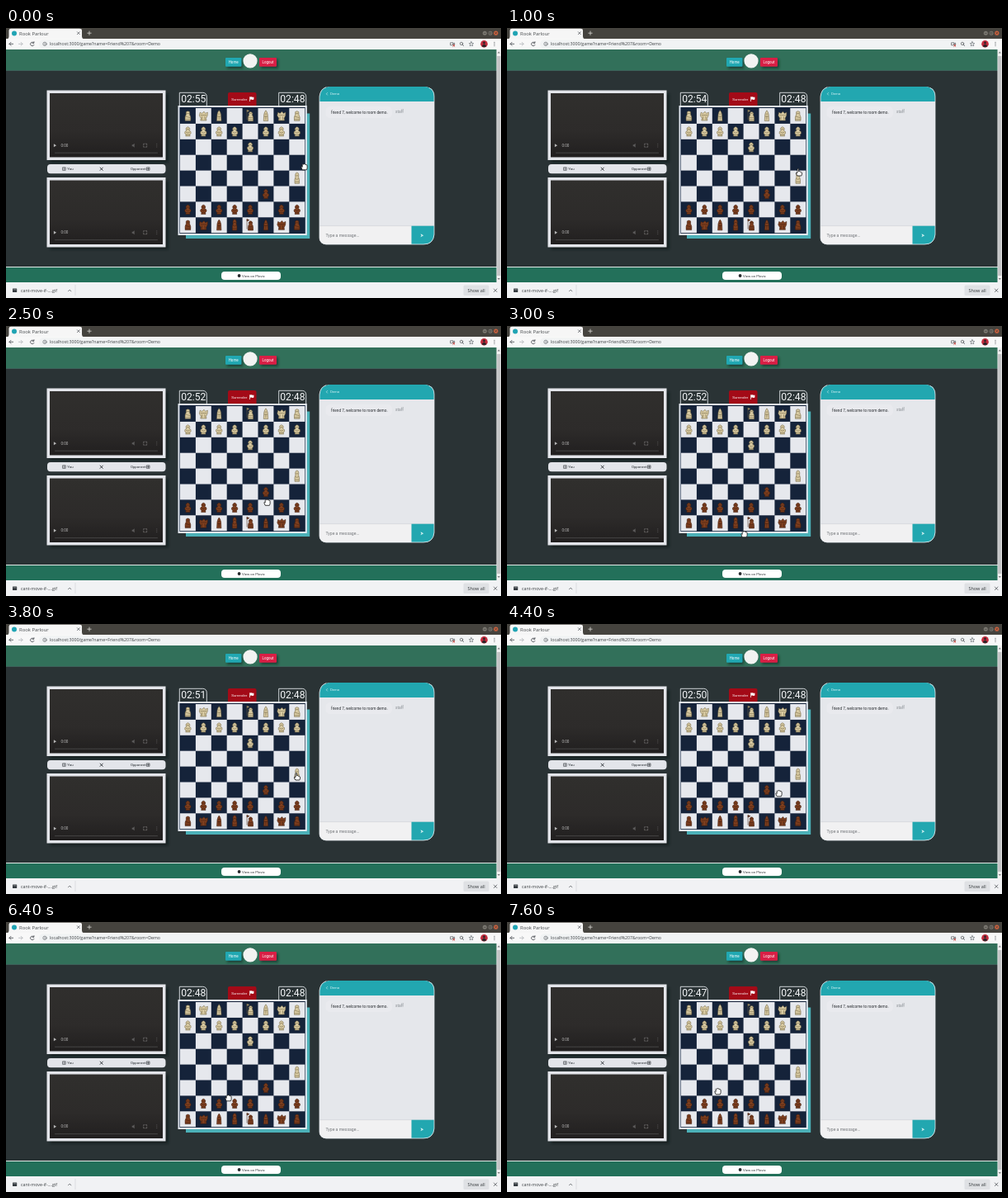
Recreate the animation shown at these times as an HTML page. Size 600 px wide and 327 px high, loop 8000 ms.

```html
<!DOCTYPE html>
<html lang="en">
<head>
<meta charset="utf-8">
<title>Chess game</title>
<style>
  html, body { margin: 0; width: 100%; height: 100%; overflow: hidden; background: #2a3335; }
  svg { display: block; width: 600px; height: 327px; }
  text { font-family: Roboto, sans-serif; white-space: pre; }
  .ui { font-family: "Open Sans", "Noto Sans", sans-serif; }
  .clock { font-size: 12.1px; fill: #f4f6f8; }
  .line { fill: none; stroke-linecap: round; stroke-linejoin: round; }
</style>
</head>
<body>
<svg viewBox="0 0 600 327">
  <defs>
    <linearGradient id="screen" x2="0" y2="1">
      <stop offset="0" stop-color="#302f2d"/><stop offset=".6" stop-color="#2d2b2a"/>
      <stop offset="1" stop-color="#211f1f"/>
    </linearGradient>
    <filter id="soft" x="-20%" y="-20%" width="150%" height="150%"><feGaussianBlur stdDeviation="1.6"/></filter>
    <clipPath id="panel"><path d="M392 71H508Q519 72 519 83V250Q518 262 506 262H388Q380 261 380 254V83Q381 72 392 71Z"/></clipPath>

    <g id="video">
      <rect x="4" y="4" width="143" height="83" fill="#0d1214" opacity=".7" filter="url(#soft)"/>
      <rect width="144" height="84.5" fill="#e3e5ea"/>
      <rect x="3.5" y="3.5" width="137" height="77.5" fill="url(#screen)"/>
      <path d="M8.4 64.7V68.7L11.6 66.7Z" fill="#b5b5b5"/>
      <text x="17" y="68.4" font-size="4.6" fill="#b9b9b9">0:00</text>
      <path class="line" d="M10 75.7H134" stroke="#4b4a4a" stroke-width=".9"/>
      <path d="M103.2 65.7h1.2l1.8-1.5v5l-1.8-1.5H103.2Z" fill="#5c5b5b"/>
      <path class="line" d="M117.2 66v-1.3h1.3M119.9 64.7h1.3V66M121.2 67.4V68.7h-1.3M118.5 68.7H117.2v-1.3M133.3 64.8v0M133.3 66.7v0M133.3 68.6v0" stroke="#858484" stroke-width=".6"/>
    </g>

    <g id="pawn">
      <path d="M-3 6.2L-2.5 4.2Q-5 2.6-3.9 .1L-1.6-1.4A2.6 2.6 0 1 1 1.6-1.4L3.9.1Q5 2.6 2.5 4.2L3 6.2Z"/>
      <path class="line" d="M-1.2-3.1H1.2M-2.2 1.2Q0 2.8 2.2 1.2M-2.3 4.3H2.3"/>
    </g>
    <g id="rook">
      <path d="M-3.6 6.5Q-4.4 1-2.4-1.5L-2.3-5.4Q0-7.4 2.3-5.4L2.4-1.5Q4.4 1 3.6 6.5Z"/>
      <path class="line" d="M-1.4-3.2H1.4M-2.8.8L2.8 2.4M-3 4.8H3"/>
    </g>
    <g id="knight">
      <path d="M-4 6.2L-3.4 3.2L-5.6-.5L-4.6-4.8L-2-3.4L.8-5.8L2.6-3.4L5.6-4.8L5.4-.6L3.6 3.2L4 6.2Z"/>
      <path class="line" d="M-3.6-1H3.8M-2 1.2L-2.2 5M1.8 1.2L2 5"/>
    </g>
    <g id="bishop">
      <path d="M-3 6.8L-2.5-1.8Q-1.8-5.6 0-7.4Q1.8-5.6 2.5-1.8L3 6.8Z"/>
      <path class="line" d="M-1.2-2.5H1.2M-1.8.7H1.8M0 .7V5"/>
    </g>
    <g id="queen">
      <path d="M-3 7Q-3.6 1-2.1-1.6Q-2.8-5-1.6-7L0-7.8L1.6-7Q2.8-5 2.1-1.6Q3.6 1 3 7Z"/>
      <path class="line" d="M-1.1-3.6H1.1M-2 .8Q0 2.2 2 .8M-2.2 4.7H2.2"/>
    </g>
    <g id="king">
      <path d="M-2.8 7Q-3.4.6-1.4-1.2A2.5 2.5 0 1 1 2.4-1.2Q4.4.6 3.8 7ZM-4.4-8L-1.2-6.8L-4.4-5.4Z"/>
      <path class="line" d="M-4.4-8V5M-.9-3.2H1.6M-1.8 2.2H2.8M-2.2 4.8H3"/>
    </g>

    <path id="open" d="M-2.8 3.8L-4.2.5Q-4-.8-2.8.4V-2.6Q-2.2-3.8-1.5-2.7Q-.7-4.4.2-2.8Q1.2-3.8 1.7-2.2Q3-2.8 3.1-1.2V1.8L2.3 3.8Z"/>
    <path id="point" d="M-2 4L-3.8 1Q-3.6-.4-2 .6V-4.2Q-1.2-5.4-.4-4.2V-1.2Q.6-1.8 1.1-.8Q2-1.2 2.4-.3Q3.5-.5 3.5.7V2.2L2.8 4Z"/>
    <path id="corner" class="line" d="M0 17V0H28.5Q33 .4 33 5V17" stroke="#e3e7ea" stroke-width=".9"/>
  </defs>

  <!-- browser -->
  <rect width="600" height="14" fill="#45433e"/>
  <path d="M1 13.5Q3.5 13 3.5 10V3Q3.5.8 6 .8H89Q92 .8 92 3V10Q92 13 95 13.5Z" fill="#f6f6f6"/>
  <circle cx="10" cy="6.4" r="3" fill="#20a4b4"/>
  <text class="ui" x="16" y="8.5" font-size="5.9" fill="#45484b">Rook Parlour</text>
  <g class="line" stroke-width=".8">
    <path d="M86.3 4.7l3 3m0-3l-3 3" stroke="#5f6368"/>
    <path d="M98.8 6.2h4.4m-2.2-2.2v4.4" stroke="#dad8d3"/>
  </g>
  <g fill="#7d7a73">
    <circle cx="580.3" cy="6.2" r="2.5"/><circle cx="587" cy="6.2" r="2.5"/>
    <circle cx="593.8" cy="6.2" r="2.6" fill="#c9613f"/>
  </g>
  <path class="line" d="M579.2 6.3h2.2M586 5.2h2v2h-2ZM592.9 5.3l1.8 1.8m0-1.8l-1.8 1.8" stroke="#35332f" stroke-width=".6"/>
  <rect y="13" width="600" height="13" fill="#f8f8f8"/>
  <rect x="40" y="14.3" width="527" height="10.2" rx="5.1" fill="#f1f3f4"/>
  <g class="line" stroke="#55595e" stroke-width=".9">
    <path d="M8.6 19.3H4m2-2l-2 2l2 2"/>
    <path d="M15.5 19.3h4.6m-2-2l2 2l-2 2" stroke="#b9bcc0"/>
    <path d="M33.7 18A2.3 2.3 0 1 0 34 20.4M33.9 16.6v1.7h-1.8"/>
    <circle cx="47" cy="19.3" r="2.2" stroke-width=".6"/>
    <path d="M47 19.2v1.1M47 18.2v0" stroke-width=".6"/>
    <path d="M539 17.8h3v3h-3ZM542 19.3l1.6-1.2v2.4Z" stroke-width=".7"/>
    <path d="M541.8 20.4l2 1.9m0-1.9l-2 1.9" stroke="#d33a31"/>
    <circle cx="552" cy="18.9" r="1.7" stroke-width=".7"/><path d="M553.3 20.2l1.3 1.3"/>
    <path d="M564 16.7l.8 1.7 1.9.2-1.4 1.3.4 1.8-1.7-.9-1.7.9.4-1.8-1.4-1.3 1.9-.2Z" stroke-width=".6"/>
    <path d="M592 17.3v0M592 19.4v0M592 21.5v0" stroke-width="1.2"/>
  </g>
  <text class="ui" x="53" y="21.3" font-size="5.25" fill="#3c4043">localhost:3000/game?name=Friend%207&amp;room=Demo</text>
  <circle cx="579.5" cy="19.3" r="4.3" fill="#c32c3d"/>
  <circle cx="579.5" cy="18" r="1.4" fill="#2c2529"/>
  <path d="M576.9 22.2Q577.1 19.8 579.5 19.7Q581.9 19.8 582.1 22.2Q579.5 24.4 576.9 22.2Z" fill="#2c2529"/>

  <!-- page -->
  <rect y="26" width="595" height="25" fill="#32705a"/>
  <rect y="51" width="595" height=".8" fill="#426d63"/>
  <rect y="289" width="595" height="1" fill="#dfe8e5"/>
  <rect y="290" width="595" height="18" fill="#23705a"/>
  <rect x="594.5" y="26" width="5.5" height="282" fill="#f1f1f1"/>
  <rect x="595.2" y="34" width="4.2" height="266" fill="#c3c4c5"/>
  <path d="M595.7 30.5h3.2l-1.6-2ZM595.7 303h3.2l-1.6 2Z" fill="#77797b"/>

  <rect x="268" y="38" width="19" height="11" fill="#10231e" opacity=".6" filter="url(#soft)"/>
  <rect x="309" y="38" width="21" height="11" fill="#10231e" opacity=".6" filter="url(#soft)"/>
  <rect x="266" y="36" width="19.5" height="10.8" rx="1" fill="#21a8b2"/>
  <rect x="307" y="36" width="21" height="10.8" rx="1" fill="#d81f45"/>
  <text x="275.7" y="43" font-size="4.5" fill="#fff" text-anchor="middle">Home</text>
  <text x="317.5" y="43" font-size="4.5" fill="#fff" text-anchor="middle">Logout</text>
  <circle cx="296" cy="39.8" r="8.6" fill="#f2f3f2"/>

  <use href="#video" x="49.5" y="75.5"/>
  <use href="#video" x="49.5" y="181"/>
  <rect x="50" y="165" width="143.5" height="11.3" rx="4" fill="#e3e5ea"/>
  <g fill="#22282c" font-size="4.3">
    <text x="74.3" y="172.2">You</text>
    <text x="151" y="172.2">Opponent</text>
  </g>
  <path class="line" d="M69 168.9h3.2v3.4h-3.2ZM70.6 169.8v1.5M170.8 168.9h3.2v3.4h-3.2ZM171.6 170.6h1.6m-.8-.8v1.6" stroke="#22282c" stroke-width=".6"/>
  <path class="line" d="M114.1 169.1l3.2 3.2m0-3.2l-3.2 3.2" stroke="#22282c" stroke-width=".9"/>

  <!-- board -->
  <use href="#corner" x="210.3" y="78.3"/>
  <use href="#corner" x="330.7" y="78.3"/>
  <text id="mine" class="clock" x="227.2" y="90.3" text-anchor="middle">02:55</text>
  <text class="clock" x="347.4" y="90.3" text-anchor="middle">02:48</text>
  <path d="M269 95V80Q269 78 271 78H301.5Q303.5 78 303.5 80V95Z" fill="#a30a17"/>
  <text x="273.3" y="87.7" font-size="4.4" fill="#fff">Surrender</text>
  <path d="M295 83.2h.7v5.8h-.7ZM295.9 83.5Q297.3 82.8 298.3 83.5T300.4 83.4V86.6Q299.3 87.2 298.2 86.7T295.9 86.8Z" fill="#fff"/>
  <rect x="218" y="103.5" width="150.2" height="151.5" fill="#4cb1b8"/>
  <rect x="208.5" y="94" width="156.3" height="157" fill="#e2e8f1"/>
  <rect x="210.4" y="96" width="152.4" height="153" fill="#15233a"/>
  <g id="squares" fill="#e6e8ed"></g>
  <g id="pieces" stroke-width=".6"></g>

  <!-- chat -->
  <g clip-path="url(#panel)">
    <rect x="380" y="71" width="140" height="192" fill="#e5e7eb"/>
    <rect x="380" y="71" width="140" height="18" fill="#22a7b0"/>
    <rect x="380" y="240" width="111.5" height="23" fill="#f1f1f2"/>
    <rect x="380" y="239.4" width="140" height=".7" fill="#d3d6d9"/>
    <rect x="491.5" y="239.7" width="28" height="23" fill="#22a7b0"/>
  </g>
  <path class="line" d="M513 72.5Q519 75 519 83V250Q518 262 506 262H388Q380 261 380 254V83Q381 74 388 71.6" stroke="#e7edf0" stroke-width=".8"/>
  <path class="line" d="M389.5 78.5l-1.2 1.3 1.2 1.3" stroke="#d8f3f4" stroke-width=".6"/>
  <text x="393" y="81.4" font-size="4.3" fill="#d8f3f4">Demo</text>
  <rect x="387.5" y="95" width="80.5" height="14" rx="5" fill="#e9eaee"/>
  <text x="394" y="103.6" font-size="4.7" fill="#292d31">friend 7, welcome to room demo.</text>
  <text x="472" y="103.4" font-size="4.8" fill="#858a8f">staff</text>
  <text x="387.5" y="252.7" font-size="5.1" fill="#74777b">Type a message...</text>
  <path d="M502.6 249.2L506.2 251.2L502.6 253.2L503.1 251.5L504.8 251.2L503.1 250.9Z" fill="#d8f3f4"/>

  <!-- footer and downloads -->
  <rect x="261" y="295" width="72" height="10" rx="4" fill="#fff"/>
  <circle cx="282.6" cy="300" r="1.9" fill="#26292c"/>
  <text x="286" y="301.7" font-size="4.3" fill="#33383b">View on Plovix</text>
  <rect y="308" width="600" height="19" fill="#f1f2f4"/>
  <rect x="8" y="315.5" width="5.2" height="4.6" rx=".5" fill="#343a3f"/>
  <path d="M8.6 316.8h4" stroke="#ccc" stroke-width=".5"/>
  <text class="ui" x="18" y="320" font-size="5.3" fill="#3c4043">cant-move-if-....gif</text>
  <path class="line" d="M75.5 318.8l1.7-1.7 1.7 1.7M591.4 316l3.6 3.6m0-3.6l-3.6 3.6" stroke="#55595e" stroke-width=".8"/>
  <path d="M84 311v13" stroke="#d3d6d9" stroke-width=".7"/>
  <rect x="554.5" y="311.5" width="31" height="12.5" rx="1.5" fill="#dfe1e4"/>
  <text class="ui" x="570" y="319.9" font-size="5.5" fill="#35393c" text-anchor="middle">Show all</text>

  <use id="hand" href="#open" fill="#fff" stroke="#111" stroke-width=".8" stroke-linejoin="round"/>
</svg>
<script>
const $ = id => document.getElementById(id);
const LOOP = 8000, STEP = 100, FIRST_TICK = 200, CELL = 18.9, LEFT = 211, TOP = 97;

function add(parent, tag, attrs) {
  const el = document.createElementNS("http://www.w3.org/2000/svg", tag);
  for (const k in attrs) el.setAttribute(k, attrs[k]);
  parent.append(el);
}

// Upper case is ivory, lower case is brown.
const board = ["RNB.KBNR", "PPPP.PPP", "....P...", "........",
               ".......Q", ".....p..", "ppppp.pp", "rnbqkbnr"];
const kinds = { p: "pawn", r: "rook", n: "knight", b: "bishop", q: "queen", k: "king" };
const ivory = { fill: "#d8caa2", stroke: "#6f6140" };
const brown = { fill: "#7e3f1f", stroke: "#3f1d0e" };

board.forEach((row, r) => [...row].forEach((ch, c) => {
  const x = LEFT + c * CELL, y = TOP + r * CELL;
  if ((r + c) % 2) add($("squares"), "rect", { x, y, width: CELL, height: CELL });
  const kind = kinds[ch.toLowerCase()];
  if (kind) add($("pieces"), "use", {
    href: "#" + kind,
    transform: `translate(${x + CELL / 2} ${y + CELL / 2}) scale(.9)`,
    ...(ch < "a" ? ivory : brown)
  });
}));

// [ms, x, y, hand shape]
const path = [
  [0, 362, 168, "open"], [900, 362, 168, "open"], [1000, 354, 175, "point"],
  [1400, 346, 175, "open"], [2000, 346, 175, "open"], [3000, 288, 252, "open"],
  [3800, 353, 185, "point"], [4400, 330, 205, "open"], [4900, 326, 208, "open"],
  [5200, 304, 222, "open"], [6000, 270, 213, "open"], [6700, 270, 213, "open"],
  [7400, 256, 205, "open"], [LOOP, 256, 205, "open"]
];

function draw(t) {
  const i = path.findIndex((p, n) => t < path[n + 1][0]);
  const [t0, x0, y0, shape] = path[i], [t1, x1, y1] = path[i + 1];
  const k = (t - t0) / (t1 - t0);
  const hand = $("hand");
  hand.setAttribute("href", "#" + shape);
  hand.setAttribute("transform", `translate(${x0 + (x1 - x0) * k} ${y0 + (y1 - y0) * k})`);
  $("mine").textContent = "02:" + (55 - Math.ceil((t - FIRST_TICK + 1) / 1000));
}

const start = performance.now();
function loop() {
  const t = (performance.now() - start) % LOOP;
  draw(Math.floor(t / STEP) * STEP);
  requestAnimationFrame(loop);
}
loop();
</script>
</body>
</html>
```
